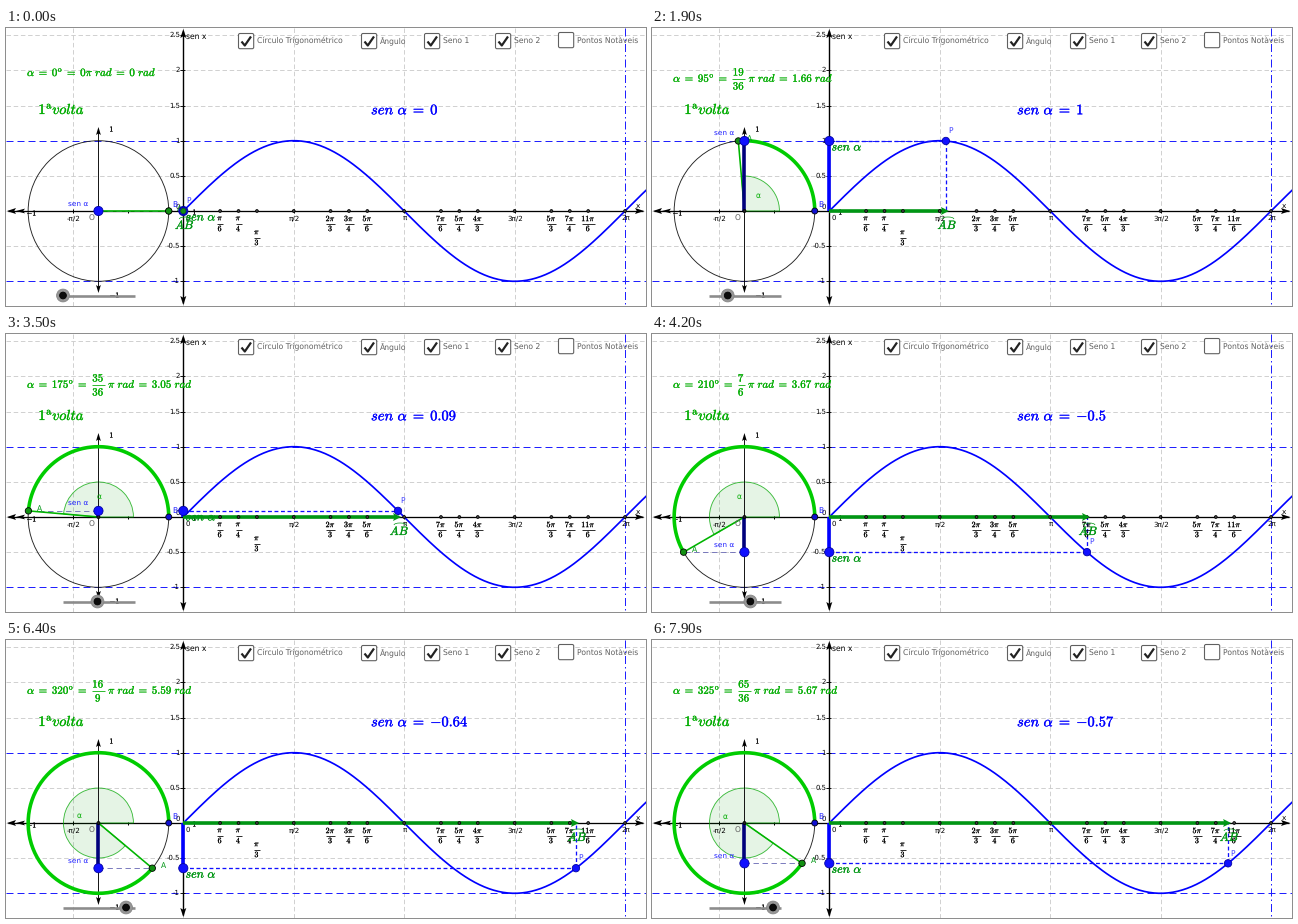
A matplotlib script that plays this animation: 640 by 278 pixels, repeating every 8 s.

```python
import math

import numpy as np
import matplotlib as mpl
import matplotlib.pyplot as plt
from matplotlib.animation import FuncAnimation
from matplotlib.patches import Arc, Circle, FancyBboxPatch, Polygon, Wedge
from matplotlib.patheffects import withStroke

mpl.rcParams["mathtext.fontset"] = "cm"
mpl.rcParams["font.family"] = "DejaVu Sans"
mpl.rcParams["text.hinting"] = "none"

W, H, DPI = 640, 278, 64
PX = 72 / DPI                 # points per pixel
UNIT = 70.3                   # pixels per axis unit
X0, Y0 = 177.3, 183           # origin of the graph
CX = 92.45                    # centre of the circle
FRAMES, STEP, TOP = 80, 5, 72

BLUE, GREEN, DARK = "#0000ff", "#00cc00", "#009614"
TEXT_GREEN, GRAY = "#00ac00", "#606060"

fig = plt.figure(figsize=(W / DPI, H / DPI), dpi=DPI, facecolor="white")
ax = fig.add_axes([0, 0, 1, 1])
ax.set_xlim(0, W)
ax.set_ylim(H, 0)
ax.axis("off")


def line(xs, ys, color, lw=1, z=2, dash="-", **kw):
    return ax.plot(xs, ys, color=color, lw=lw * PX, ls=dash, zorder=z,
                   dash_capstyle="butt", solid_capstyle="butt", **kw)[0]


def dot(x, y, r, color, edge="black", lw=0.8, z=8):
    return ax.add_patch(Circle((x, y), r, fc=color, ec=edge, lw=lw * PX, zorder=z))


def label(x, y, s, size=7.4, color="black", ha="center", va="center", z=7):
    return ax.text(x, y, s, fontsize=size * PX, color=color, ha=ha, va=va, zorder=z)


def formula(x, y, s, size, color, ha="left", va="baseline", z=7, bold=0.3):
    t = label(x, y, f"${s}$", size, color, ha, va, z)
    t.set_path_effects([withStroke(linewidth=bold * PX, foreground=color)])
    return t


def fraction(x, y, top, bottom, width, gap, size, color, bold=0.2):
    """Fraction centred at x with its bar at y."""
    return [formula(x, y - gap, top, size, color, "center", "center", 6, bold),
            formula(x, y + gap, bottom, size, color, "center", "center", 6, bold),
            line([x - width / 2, x + width / 2], [y, y], color, 0.8, 6)]


def head(x, y, dx, dy, size=9, half=3, color="black", z=4):
    """Arrowhead with its tip at (x, y) pointing along (dx, dy)."""
    bx, by = x - dx * size, y - dy * size
    nx, ny = -dy * half, dx * half
    mid = (x - dx * size * 0.8, y - dy * size * 0.8)
    pts = [(x, y), (bx + nx, by + ny), mid, (bx - nx, by - ny)]
    return ax.add_patch(Polygon(pts, fc=color, ec="none", zorder=z))


def gx(t):
    return X0 + UNIT * t


def gy(v):
    return Y0 - UNIT * v


def number(v):
    s = f"{v:.2f}".rstrip("0").rstrip(".")
    return "0" if s == "-0" else s


def draw_grid():
    for i in range(-1, 5):
        x = gx(i * math.pi / 2)
        if i < 4:
            line([x, x], [0, H], "#cccccc", 0.9, 0, (0, (5, 3)))
        line([x, x], [Y0 - 2, Y0 + 2], "black", 1, 3)
    for i in range(-2, 6):
        y = gy(i / 2)
        if abs(i) != 2:
            line([0, W], [y, y], "#cccccc", 0.9, 0, (0, (5, 3)))
        line([X0 - 3, X0 + 2], [y, y], "black", 0.9, 3)
        label(174, y if i else y - 4, number(i / 2), 6.9, ha="right")
    for v in (1, -1):
        line([0, W], [gy(v)] * 2, "#2020ff", 1, 1, (0, (7, 4)))
    line([gx(2 * math.pi)] * 2, [0, H], "#2020ff", 1, 1, (0, (8, 3, 1.5, 3)))


def draw_axes():
    line([2, W - 3], [Y0, Y0], "black", 1.3, 3)
    line([X0, X0], [3, H - 3], "black", 1.4, 3)
    head(W - 2, Y0, 1, 0)
    head(1, Y0, -1, 0)
    head(X0, 1, 0, -1)
    head(X0, H - 1, 0, 1)
    line([CX, CX], [102, 262], "black", 0.9, 4)
    head(CX, 99, 0, -1, 8, 2.4)
    head(CX, 265, 0, 1, 8, 2.4)
    head(10, Y0, -1, 0, 9, 2.4)
    line([122.3, 122.3], [Y0 - 1.5, Y0 + 1.5], "black", 1, 3)
    label(190.7, 9, "sen x", 7.6)
    label(631.5, 178, "x")
    ticks = [(-1, "-π/2"), (1, "π/2"), (2, "π"), (3, "3π/2"), (4, "2π")]
    for i, s in ticks:
        label(gx(i * math.pi / 2) + 0.7, 190, s, 7.1)
    label(182, 190, "0", 6.9)
    for x, y, s in [(106, 101, "1"), (189, 184, "1"), (109, 267, "{-}1"), (26, 185, "{-}1")]:
        formula(x, y, s, 7.5, "black", "center", "center", 5, 0.2)
    label(86, 191, "O", 7.5, GRAY)


def draw_marks():
    marks = [(1, 6), (1, 4), (1, 3), (2, 3), (3, 4), (5, 6),
             (7, 6), (5, 4), (4, 3), (5, 3), (7, 4), (11, 6)]
    for n, d in marks:
        x = gx(n * math.pi / d)
        dot(x, Y0, 1.4, "#444444", z=7)
        y = 209.5 if (n, d) == (1, 3) else 195.5
        top = r"\pi" if n == 1 else rf"{n}\pi"
        width = 6 if n == 1 else 5 + 4 * len(str(n))
        fraction(x + 0.3, y, top, str(d), width, 5, 8, "black", 0.15)
    for i in range(1, 5):
        dot(gx(i * math.pi / 2), Y0, 1.4, "#444444", z=7)


def draw_boxes():
    boxes = [(232, "Círculo Trigonométrico"), (355, "Ângulo"), (418, "Seno 1"),
             (489, "Seno 2"), (552, "Pontos Notàveis")]
    for x, s in boxes:
        on = x != 552
        y = 5.5 if on else 4.5
        ax.add_patch(FancyBboxPatch((x + 1.3, y + 0.8), 13.6, 13.6,
                                    boxstyle="round,pad=0.8,rounding_size=1.5",
                                    fc="white", ec=GRAY, lw=1.1 * PX, zorder=5))
        if on:
            line([x + 3.5, x + 6.8, x + 13], [13.5, 17.5, 8.5], "#222222", 2.2, 6)
        label(x + 18.7, y + 7.8, s, 7.65, GRAY, "left")


def draw_static():
    draw_grid()
    draw_axes()
    draw_marks()
    draw_boxes()
    ax.add_patch(Circle((CX, Y0), UNIT, fc="none", ec="#222222", lw=0.9 * PX, zorder=2))
    t = np.linspace(0, 6.7, 300)
    line(gx(t), gy(np.sin(t)), BLUE, 1.7, 4)
    dot(CX + UNIT, Y0, 3, "#1010d0")
    label(168.5, 177, "B", 7.5, "#2020ff")
    line([57, 129], [267.5, 267.5], "#8c8c8c", 2.6, 5)
    formula(32.3, 86, r"1^{\mathrm{a}}volta", 14.5, TEXT_GREEN)


def right_edge(text):
    box = text.get_window_extent()
    return ax.transData.inverted().transform((box.x1, box.y0))[0]


def angle_text(deg):
    size, bold = 11, 0.25
    g = math.gcd(deg, 180)
    n, d = deg // g, 180 // g
    left = rf"\alpha\;=\;{deg}^{{\mathrm{{o}}}}\;="
    right = rf"\pi\ rad\;=\;{number(math.radians(deg))}\ rad"
    if d == 1:
        return [formula(21, 48, rf"{left}\;{n}{right}", size, TEXT_GREEN, bold=bold)]
    base = 53.8
    first = formula(21, base, left, size, TEXT_GREEN, bold=bold)
    width = 0.55 * size * max(len(str(n)), len(str(d))) + 1
    x = right_edge(first) + 4
    return [first,
            *fraction(x + width / 2, base - 2.8, str(n), str(d), width, 7,
                      size, TEXT_GREEN, bold),
            formula(x + width + 3, base, right, size, TEXT_GREEN, bold=bold)]


def draw_circle_part(deg, a, y):
    ca = CX + UNIT * math.cos(a)
    made = [line([CX, ca], [Y0, y], "#00b400", 1.6, 5),
            line([CX, ca], [y, y], "#7070b8", 0.9, 4, (0, (6, 4))),
            line([CX, CX], [Y0, y], "#00007c", 3.6, 5),
            dot(CX, Y0, 1.5, "#222222"),
            dot(ca, y, 3.2, "#129012", z=9),
            dot(CX, y, 4.6, "#1010ff", "#0000a0", z=9),
            label(ca + 11, y - 2.5, "A", 7.5, DARK),
            label(62.5, y - 6.5, "sen α", 7.4, "#2020ff", "left")]
    if deg:
        t = np.linspace(0, a, 160)
        made += [line(CX + UNIT * np.cos(t), gy(np.sin(t)), GREEN, 3.6, 5),
                 ax.add_patch(Wedge((CX, Y0), 35, -deg, 0, fc=(0, 0.6, 0, 0.1),
                                    ec=(0, 0.65, 0, 0.75), lw=0.9 * PX, zorder=3)),
                 label(CX + 20.5 * math.cos(a / 2), Y0 - 20.5 * math.sin(a / 2),
                       "α", 7.5, TEXT_GREEN)]
    return made


def draw_graph_part(deg, a, y):
    px = gx(a)
    dash = (0, (3, 2))
    made = [line([X0, X0], [Y0, y], BLUE, 3.6, 6),
            line([X0, px], [y, y], "#1010ff", 1.3, 5, dash),
            line([px, px], [y, Y0], "#1010ff", 1.3, 5, dash),
            dot(X0, y, 4.6, "#1010ff", "#0000a0", z=9),
            dot(px, y, 3.7, "#1010ff", "#0000a0", z=9),
            label(px + 4.8, y - 10, "P", 7.5, "#4040ff"),
            formula(179.5, y + 9.5, r"sen\ \alpha", 12, DARK),
            formula(px + 1.6, 201, "AB", 12, DARK, "center"),
            ax.add_patch(Arc((px + 2, 191), 12, 4, theta1=180, theta2=360,
                             ec=DARK, lw=0.7 * PX, zorder=7))]
    if deg:
        made += [line([X0, px - 2], [Y0, Y0], DARK, 3.6, 6),
                 head(px + 3, Y0, 1, 0, 8, 4, DARK, 7)]
    else:
        made.append(dot(X0, Y0, 2.6, "#129012", "#0a600a", z=10))
    return made


def draw_slider(deg):
    x = 57 + deg * 0.197
    return [dot(x, 267.5, 6.4, "#969696", "#858585", z=9),
            dot(x, 267.5, 3.4, "#0c0c0c", z=10)]


moving = []


def update(k):
    for artist in moving:
        artist.remove()
    deg = STEP * (TOP - abs(TOP - k))     # slider rises to a full turn, then turns back
    a = math.radians(deg)
    y = gy(math.sin(a))
    sine = number(math.sin(a)).replace("-", "{-}")
    moving[:] = [*angle_text(deg),
                 formula(365, 86.3, rf"sen\ \alpha\;=\;{sine}", 14.5, BLUE),
                 *draw_circle_part(deg, a, y),
                 *draw_graph_part(deg, a, y),
                 *draw_slider(deg)]
    return moving


draw_static()
anim = FuncAnimation(fig, update, frames=FRAMES, init_func=lambda: update(0),
                     interval=100, repeat=True, repeat_delay=0, blit=False)
plt.show()
```
